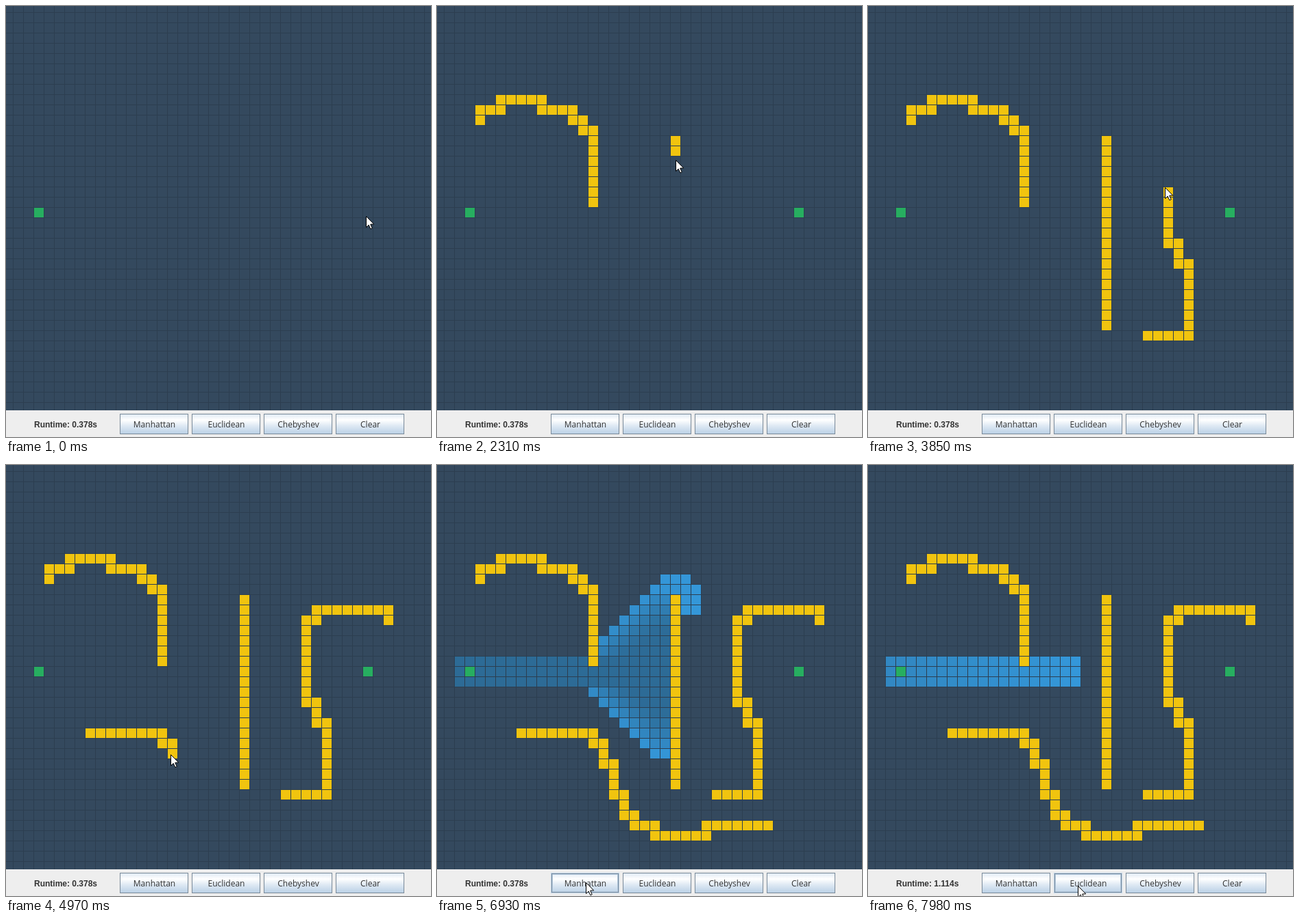
An HTML page with a canvas for the animation above (8000 ms loop, 620 by 630 pixels).

```html
<!DOCTYPE html>
<html lang="en">
<head>
<meta charset="utf-8">
<title>Pathfinding heuristics</title>
<style>
html, body { margin: 0; width: 100%; height: 100%; overflow: hidden; background: #34495e; }
canvas { display: block; }
</style>
</head>
<body>
<canvas id="stage" width="620" height="630"></canvas>
<script>
(() => {
  const ctx = document.getElementById('stage').getContext('2d');
  const LOOP = 8000, STEP = 70, CELL = 15;
  const START = [2, 19], GOAL = [34, 19];
  const MS_PER_VISIT = 8, FADE = 400;
  const GREEN = '#27ae60', YELLOW = '#f1c40f';

  const cellX = c => 11 + CELL * c;
  const cellY = r => 10 + CELL * r;
  const mix = (a, b, k) => a + (b - a) * k;
  const id = (c, r) => c + ',' + r;

  // Walls drawn by hand: first cell, then runs such as "r4" for four cells right.
  const strokes = [
    { from: 910, to: 1750, ease: 1, dx: -5, start: [3, 10], moves: 'u1 r2 u1 r4 d1 r3 d1 r1 d1 r1 d7' },
    { from: 2170, to: 2800, ease: 1.5, dx: 0, start: [22, 12], moves: 'd18' },
    { from: 3220, to: 4235, ease: 1, dx: -5, start: [26, 31], moves: 'r4 u7 l1 u2 l1 u8 r1 u1 r7 d1' },
    { from: 4660, to: 5735, ease: 1, dx: -3, start: [7, 25],
      moves: 'r7 d1 r1 d2 r1 d3 r1 d2 r1 d1 r2 d1 r5 u1 r6' }
  ];

  // Cursor turning points between the strokes: [time, x, y].
  const track = [
    [420, 525, 307], [770, 55, 159], [880, 55, 159],
    [2100, 348, 195],
    [2940, 352, 473], [3080, 413, 483], [3200, 413, 483],
    [4480, 125, 410],
    [6090, 244, 592], [6230, 217, 610], [7420, 217, 610], [7770, 306, 615]
  ];

  function trace([c, r], moves) {
    const cells = [[c, r]];
    for (const move of moves.split(' ')) {
      const dir = move[0];
      for (let i = 0; i < +move.slice(1); i++) {
        c += (dir === 'r') - (dir === 'l');
        r += (dir === 'd') - (dir === 'u');
        cells.push([c, r]);
      }
    }
    return cells;
  }

  // Each wall cell gets the time it is reached; the cursor passes there too.
  const wallCells = [], walls = new Set();
  for (const s of strokes) {
    const cells = trace(s.start, s.moves);
    cells.forEach(([c, r], i) => {
      const at = mix(s.from, s.to, Math.pow(i / (cells.length - 1), 1 / s.ease));
      wallCells.push({ c, r, at });
      walls.add(id(c, r));
      track.push([at, cellX(c) + 7 + s.dx, cellY(r) + 7]);
    });
  }
  track.sort((a, b) => a[0] - b[0]);

  function cursorAt(t) {
    const next = track.findIndex(p => p[0] >= t);
    if (next < 0) return track[track.length - 1].slice(1);
    const b = track[next], a = track[next - 1] || b;
    const k = a === b ? 0 : (t - a[0]) / (b[0] - a[0]);
    return [mix(a[1], b[1], k), mix(a[2], b[2], k)];
  }

  // Greedy best-first search; each opened cell keeps the visit that found it.
  function search(distance) {
    const first = { c: START[0], r: START[1], h: Infinity };
    const opened = [], queue = [first], seen = new Set([id(...START)]), path = [];
    let visits = 0;
    while (queue.length) {
      let best = 0;
      queue.forEach((q, i) => { if (q.h < queue[best].h) best = i; });
      const cur = queue.splice(best, 1)[0];
      if (cur.h === 0) {
        for (let p = cur; p; p = p.from) path.push(p);
        break;
      }
      for (let c = cur.c - 1; c <= cur.c + 1; c++) {
        for (let r = cur.r - 1; r <= cur.r + 1; r++) {
          const key = id(c, r);
          if (c < 0 || r < 0 || c > 40 || r > 38 || seen.has(key) || walls.has(key)) continue;
          seen.add(key);
          const h = distance(Math.abs(GOAL[0] - c), Math.abs(GOAL[1] - r));
          const node = { c, r, h, visit: visits, from: cur };
          opened.push(node);
          queue.push(node);
        }
      }
      visits++;
    }
    return { opened, path, visits };
  }

  const runs = [
    { at: 6302, until: 7840, ...search((x, y) => x + y) },
    { at: 7840, until: LOOP, ...search(Math.hypot) }
  ];
  const firstRunEnd = runs[0].at + runs[0].visits * MS_PER_VISIT;

  function fillCell(c, r, color) {
    ctx.fillStyle = color;
    ctx.fillRect(cellX(c), cellY(r), 14, 14);
  }

  function drawGrid() {
    ctx.fillStyle = '#34495e';
    ctx.fillRect(0, 0, 620, 591);
    ctx.fillStyle = '#2c3e50';
    for (let x = 10; x < 620; x += CELL) ctx.fillRect(x, 0, 1, 591);
    for (let y = 9; y < 590; y += CELL) ctx.fillRect(0, y, 620, 1);
  }

  function drawRun(run, t) {
    if (t < run.at || t >= run.until) return;
    const done = Math.floor((t - run.at) / MS_PER_VISIT);
    for (const { c, r, visit } of run.opened) {
      if (visit >= done) continue;
      const k = Math.min(1, (t - run.at - visit * MS_PER_VISIT) / FADE);
      fillCell(c, r, `rgb(${mix(52, 45, k)},${mix(152, 107, k)},${mix(219, 150, k)})`);
    }
    if (done >= run.visits) run.path.forEach(p => fillCell(p.c, p.r, GREEN));
  }

  function frameRect(x, y, w, h, color) {
    ctx.strokeStyle = color;
    ctx.lineWidth = 1;
    ctx.strokeRect(x + 0.5, y + 0.5, w - 1, h - 1);
  }

  function drawButton(label, x, hover, pressed) {
    const y = 596, w = 100, h = 30;
    const shine = ctx.createLinearGradient(0, y, 0, y + h);
    shine.addColorStop(0, '#dde8f3');
    shine.addColorStop(0.3, '#ffffff');
    shine.addColorStop(0.6, '#dde8f3');
    shine.addColorStop(1, '#b8cfe5');
    ctx.fillStyle = pressed ? '#b8cfe5' : shine;
    ctx.fillRect(x, y, w, h);
    if (hover && !pressed) {
      ['#b8cfe5', '#7a8a99', '#b8cfe5'].forEach((color, i) =>
        frameRect(x + i, y + i, w - 2 * i, h - 2 * i, color));
    } else {
      frameRect(x, y, w, h, '#7a8a99');
    }
    ctx.fillStyle = '#333333';
    ctx.font = '12px "Open Sans", sans-serif';
    ctx.textAlign = 'center';
    ctx.fillText(label, x + w / 2 + 0.5, 616);
  }

  function drawBar(t) {
    ctx.fillStyle = '#eeeeee';
    ctx.fillRect(0, 591, 620, 39);
    ctx.fillStyle = '#333333';
    ctx.font = 'bold 12px "Liberation Sans", Arial, sans-serif';
    ctx.textAlign = 'left';
    ctx.fillText(`Runtime: ${t >= firstRunEnd ? '1.114' : '0.378'}s`, 41, 616);
    drawButton('Manhattan', 166, t >= 6160 && t < 7630, t >= 6230 && t < 6370);
    drawButton('Euclidean', 271, t >= 7630, t >= 7770 && t < 7840);
    drawButton('Chebyshev', 376);
    drawButton('Clear', 481);
  }

  const arrow = new Path2D('M0 0V16L3.7 12.6L6.3 18.3L8.7 17.3L6.2 11.6L11.2 11.4Z');

  function drawCursor(x, y) {
    ctx.save();
    ctx.translate(Math.round(x) + 0.5, Math.round(y) + 0.5);
    ctx.fillStyle = '#ffffff';
    ctx.fill(arrow);
    ctx.strokeStyle = '#000000';
    ctx.lineWidth = 1;
    ctx.stroke(arrow);
    ctx.restore();
  }

  function draw(now) {
    const t = Math.floor((now % LOOP) / STEP) * STEP;
    drawGrid();
    runs.forEach(run => drawRun(run, t));
    wallCells.forEach(w => { if (t >= w.at) fillCell(w.c, w.r, YELLOW); });
    fillCell(...START, GREEN);
    if (t >= 280) fillCell(...GOAL, GREEN);
    drawBar(t);
    drawCursor(...cursorAt(t));
  }

  const began = performance.now();
  function tick() {
    draw(performance.now() - began);
    requestAnimationFrame(tick);
  }
  tick();
})();
</script>
</body>
</html>
```
